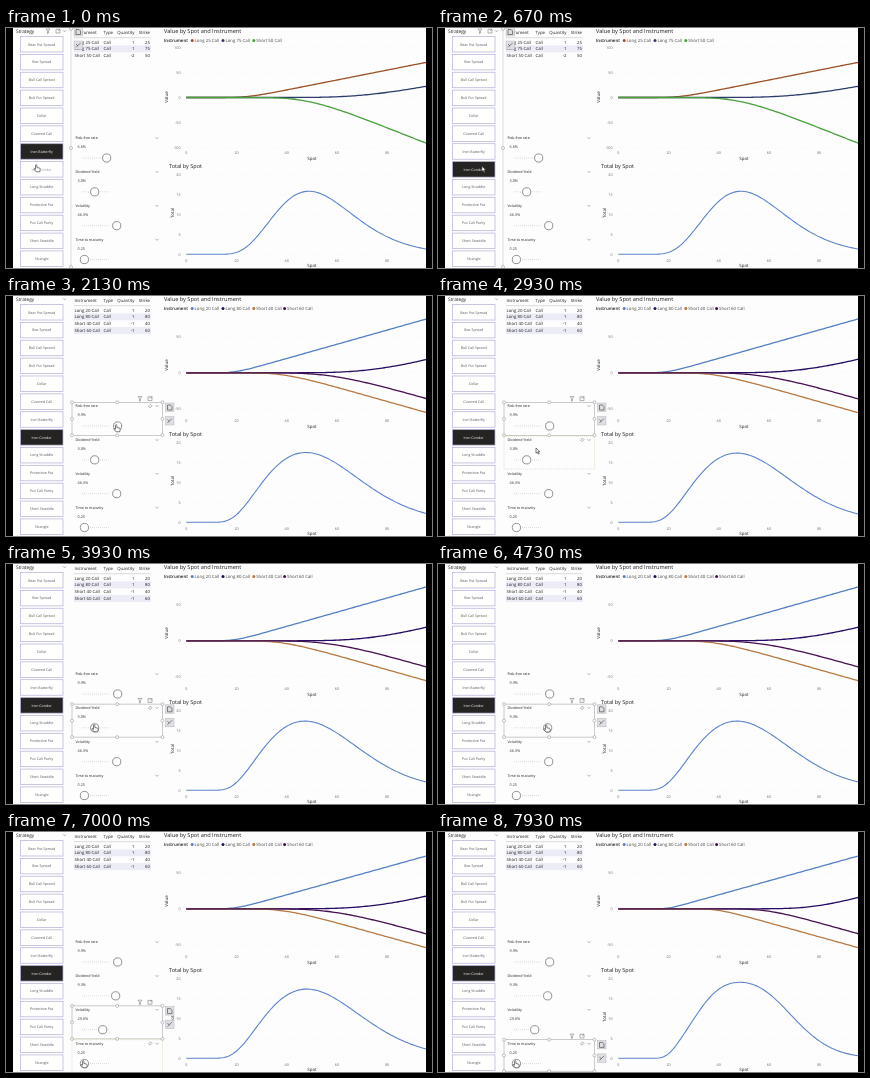
These frames come from a looping animation (426x240 px, 8000 ms). An HTML page:

```html
<!DOCTYPE html>
<html lang="en">
<head>
<meta charset="utf-8">
<title>Option strategies</title>
<style>
  html, body { margin: 0; width: 100%; height: 100%; overflow: hidden; background: #000; }
  svg { display: block; width: 100%; height: 100%; }
  text { font-family: "Open Sans", "Noto Sans", sans-serif; text-rendering: geometricPrecision; }
</style>
</head>
<body>
<svg id="stage" viewBox="0 0 426 240"></svg>
<script>
const LOOP = 8000;
const stage = document.getElementById('stage');
const INK = '#1c1c1c', SOFT = '#666';
const strategies = ['Bear Put Spread', 'Box Spread', 'Bull Call Spread', 'Bull Put Spread', 'Collar',
  'Covered Call', 'Iron Butterfly', 'Iron Condor', 'Long Straddle', 'Protective Put',
  'Put Call Parity', 'Short Straddle', 'Strangle'];
const butterfly = [[1, 25, '#9c5027'], [1, 75, '#2b3d69'], [-2, 50, '#49a03c']];
const condor = [[1, 20, '#5580c4'], [1, 80, '#260d63'], [-1, 40, '#b77a43'], [-1, 60, '#46104f']];
const sliderNames = ['Risk-free rate', 'Dividend Yield', 'Volatility', 'Time to maturity'];

// Pointer stops: time, x, y
const pointerPath = [[0, 31, 139], [450, 31, 140], [1250, 100, 131], [1550, 100, 131], [2150, 111, 131],
  [2450, 111, 132], [2930, 98, 152], [3400, 89, 163], [4000, 89, 163], [4650, 109, 163],
  [5000, 109, 165], [5450, 111, 197], [5700, 110, 197], [6300, 96, 197], [6500, 96, 199],
  [6900, 78, 231], [8000, 78, 231]];

const ease = u => u * u * (3 - 2 * u);
const ramp = (t, from, to) => ease(Math.min(1, Math.max(0, (t - from) / (to - from))));
const mix = (a, b, u) => a + (b - a) * u;

function pointerAt(t) {
  const i = Math.max(1, pointerPath.findIndex(p => p[0] > t));
  const [a, b] = [pointerPath[i - 1], pointerPath[i]];
  const u = ramp(t, a[0], b[0]);
  return [mix(a[1], b[1], u), mix(a[2], b[2], u)];
}

const text = (s, x, y, size, fill = INK, extra = '') =>
  `<text x="${x}" y="${y}" font-size="${size}" fill="${fill}" ${extra}>${s}</text>`;
const rect = (x, y, w, h, fill, extra = '') =>
  `<rect x="${x}" y="${y}" width="${w}" height="${h}" fill="${fill}" ${extra}/>`;
const circle = (x, y, r, fill, extra = '') =>
  `<circle cx="${x}" cy="${y}" r="${r}" fill="${fill}" ${extra}/>`;
const path = (d, stroke, width = 0.6, extra = '') =>
  `<path d="${d}" fill="none" stroke="${stroke}" stroke-width="${width}" ${extra}/>`;
const END = 'text-anchor="end"', MID = 'text-anchor="middle"';
const upright = (s, x, y) => text(s, 0, 0, 4.4, INK, `${MID} transform="translate(${x} ${y}) rotate(-90)"`);

const cdf = x => 1 / (1 + Math.exp(-1.5976 * x - 0.07056 * x ** 3));
function callPrice(spot, strike, { r, q, vol }) {
  const T = 0.25, sd = vol * Math.sqrt(T);
  const d = (Math.log(spot / strike) + (r - q + vol * vol / 2) * T) / sd;
  return spot * Math.exp(-q * T) * cdf(d) - strike * Math.exp(-r * T) * cdf(d - sd);
}

const X0 = 180.3, SPOT = 2.51;
function curve(value, y0, scale, color, width) {
  let d = '';
  for (let x = X0; x <= 421; x += 2) {
    const spot = Math.max(0.1, (x - X0) / SPOT);
    d += `${d ? 'L' : 'M'}${x.toFixed(1)} ${(y0 - value(spot) * scale).toFixed(2)}`;
  }
  return path(d, color, width);
}

function axes(y0, scale, ticks, xLabelY) {
  return ticks.map(v => {
    const y = y0 - v * scale;
    return path(`M${X0} ${y}H420`, '#ededed', 0.4, 'stroke-dasharray="1 2"') +
      text(v, 174.5, y + 1.3, 3.7, SOFT, END);
  }).join('') + [0, 20, 40, 60, 80].map(v => text(v, X0 + v * SPOT, xLabelY, 3.7, SOFT, MID)).join('');
}

const legName = ([n, strike]) => `${n > 0 ? 'Long' : 'Short'} ${strike} Call`;

let cached = { key: '' };
function charts(legs, market, wide) {
  const key = JSON.stringify([legs, market, wide]);
  if (key === cached.key) return cached.svg;
  const y0 = wide ? 69.5 : 76.8, scale = wide ? 0.5 : 0.715;
  let s = text('Value by Spot and Instrument', 158, 5, 5.6) +
    text('Instrument', 158, 14, 4.4, INK, 'font-weight="600"');
  legs.forEach((leg, i) => {
    const x = 186.2 + i * 30.8;
    s += circle(x, 12.6, 1.5, leg[2]) + text(legName(leg), x + 2.4, 14, 4.35, '#444');
  });
  s += axes(y0, scale, wide ? [100, 50, 0, -50, -100] : [50, 0, -50], 126);
  legs.forEach(([n, strike, color]) => {
    s += curve(p => n * callPrice(p, strike, market), y0, scale, color, 1.3);
  });
  s += text('Spot', 306, 132, 4.4, INK, MID) + upright('Value', 162.3, 69);
  s += text('Total by Spot', 163, 139.7, 5.5) + axes(226.3, 4, [20, 15, 10, 5, 0], 234);
  s += curve(p => legs.reduce((sum, [n, k]) => sum + n * callPrice(p, k, market), 0), 226.3, 4, '#5c83cc', 1.1);
  s += text('Spot', 306, 239, 4.4, INK, MID) + upright('Total', 168, 185);
  cached = { key, svg: s };
  return s;
}

function strategyList(selected, t) {
  let s = text('Strategy', 10, 5.2, 4.8) + path('M57 2.3l1.5 1.5 1.5-1.5', SOFT, 0.5);
  strategies.forEach((name, i) => {
    const y = 8.5 + i * 17.87, on = i === selected, hover = i === 7 && t < 900;
    s += rect(14.5, y, 42.5, 15.5, on ? '#252423' : '#fff', 'stroke="#b3b0d6" stroke-width=".7"') +
      text(name, 35.7, y + 9, 3.6, on ? '#fff' : hover ? '#999' : '#555', MID);
  });
  return s;
}

function table(legs) {
  const row = (cells, y, size) => text(cells[0], 68.5, y, size) + text(cells[1], 97.5, y, size) +
    text(cells[2], 128.5, y, size, INK, END) + text(cells[3], 144, y, size, INK, END);
  let s = row(['Instrument', 'Type', 'Quantity', 'Strike'], 5.5, 4.3) + path('M68 9.7H145', '#bbb', 0.5);
  legs.forEach((leg, i) => {
    const y = 10.5 + i * 6.9;
    if (i % 2) s += rect(68, y, 77, 6.9, '#ececf7');
    s += row([legName(leg), 'Call', leg[0], leg[1]], y + 5, 4.3);
  });
  return s;
}

const filterIcons = (x, y) =>
  path(`M${x - 2} ${y - 2}h4l-1.5 2v2l-1 .7v-2.7z`, SOFT, 0.5) +
  path(`M${x + 8} ${y - 1.8}h4v3.8h-4zM${x + 10} ${y}l2-2`, SOFT, 0.5);

const sideIcons = (x, y) => [0, 13.5].map((dy, i) =>
  rect(x, y + dy, 8.5, 8.5, '#dedee4', 'stroke="#aaa" stroke-width=".4"') +
  path(i ? `M${x + 2} ${y + dy + 6.5}l4.5-4.5M${x + 2} ${y + dy + 3}l2 2` : `M${x + 2} ${y + 2}h3l1.5 1.5v3.5h-4.5z`, '#555', 0.7)).join('');

const boxTop = i => 106.3 + i * 33.8;

function selection(i) {
  const y = boxTop(i), h = i === 3 ? 31.5 : 33;
  let s = rect(66, y, 90.5, h, 'none', 'stroke="#999" stroke-width=".5"');
  for (const px of [66, 111.2, 156.5]) for (const py of [y, y + h / 2, y + h])
    if (px !== 111.2 || py !== y + h / 2) s += circle(px, py, 1.5, '#fff', 'stroke="#888" stroke-width=".5"');
  return s + filterIcons(134, y - 3.7) + sideIcons(159.5, y + 0.7);
}

function sliders(values, hover) {
  const percent = v => v.toFixed(1) + '%';
  const knobs = [78.7 + values[0] * 3.33, 78.7 + values[1] * 3.33, 73.2 + values[2] * 0.81, 78.4];
  return sliderNames.map((name, i) => {
    const y = 111.3 + i * 33.85;
    let s = text(name, 69.5, y, 3.6) + text(i < 3 ? percent(values[i]) : '0.25', 71.5, y + 9, 3.8, '#333') +
      path(`M76 ${y + 18.7}H103`, '#ccc', 0.7, 'stroke-dasharray="1 1"') +
      circle(knobs[i], y + 18.7, 4.1, '#fff', 'stroke="#777" stroke-width=".8"') +
      path(`M149.5 ${y - 2}l1.5 1.5 1.5-1.5`, SOFT, 0.5);
    if (i === hover) s += path(`M142.5 ${y - 1}l2-2 1.5 1.5-2 2z`, SOFT, 0.5);
    return s;
  }).join('');
}

function pointer([x, y], hand) {
  const d = hand
    ? 'M-1.5-1.5c0-1.2 1.4-1.2 1.4 0v2l2.6.6c1 .3 .8 1.5 .2 3.7h-3.6l-2.2-2.6c-.3-.7 .7-1 1.6 0z'
    : 'M0 0v5.2l1.3-1.1 1 2 .9-.4-1-2h1.7z';
  return `<path d="${d}" transform="translate(${x.toFixed(2)} ${y.toFixed(2)})" fill="#fff" stroke="#222" stroke-width=".6"/>`;
}

function render(t) {
  const picked = t >= 330, loaded = t >= 730;
  const legs = loaded ? condor : butterfly;
  const values = [mix(6.6, 9.9, ramp(t, 1550, 2150)), mix(3, 9.3, ramp(t, 4000, 4650)), mix(46.3, 29, ramp(t, 5700, 6300))];
  const market = {
    r: t < 2450 ? 0.066 : 0.099,
    q: t < 4950 ? 0.03 : 0.093,
    vol: t < 7250 ? 0.463 : 0.29
  };
  const wide = !loaded || (t >= 4950 && t < 6650);
  const chosen = [1550, 3500, 5700, 7100].filter(start => t >= start).length - 1;
  const at = pointerAt(t);
  const hover = at[0] > 66 && at[1] > 106 ? Math.min(3, Math.floor((at[1] - 106.3) / 33.8)) : -1;

  let s = rect(7, 0, 413, 240, '#fdfdfd') + strategyList(picked ? 7 : 6, t) + table(legs) +
    charts(legs, market, wide) + sliders(values, hover);
  if (chosen < 0) {
    s += path('M65 0V240', '#bbb', 0.5) + sideIcons(68, -0.5);
    for (const y of [1, 120, 239]) s += circle(65, y, 1.5, '#fff', 'stroke="#888" stroke-width=".5"');
    if (t < 900) s += filterIcons(42, 3);
  } else s += selection(chosen);
  if (hover >= 0 && hover !== chosen) {
    const y = boxTop(hover);
    s += rect(66, y, 90.5, 33, 'none', 'stroke="#c9c59a" stroke-width=".5" stroke-dasharray="1 1"');
    if (chosen < 0) s += filterIcons(134, y - 3.7);
  }
  const travelling = (t > 600 && t < 1200) || (t > 2450 && t < 3350) || (t > 5050 && t < 5400) || (t > 6530 && t < 6850);
  return s + pointer(at, !travelling) + rect(0, 0, 7, 240, '#000') + rect(420, 0, 6, 240, '#000');
}

let shown = '';
function tick() {
  const svg = render(performance.now() % LOOP);
  if (svg !== shown) stage.innerHTML = shown = svg;
  requestAnimationFrame(tick);
}
tick();
</script>
</body>
</html>
```
